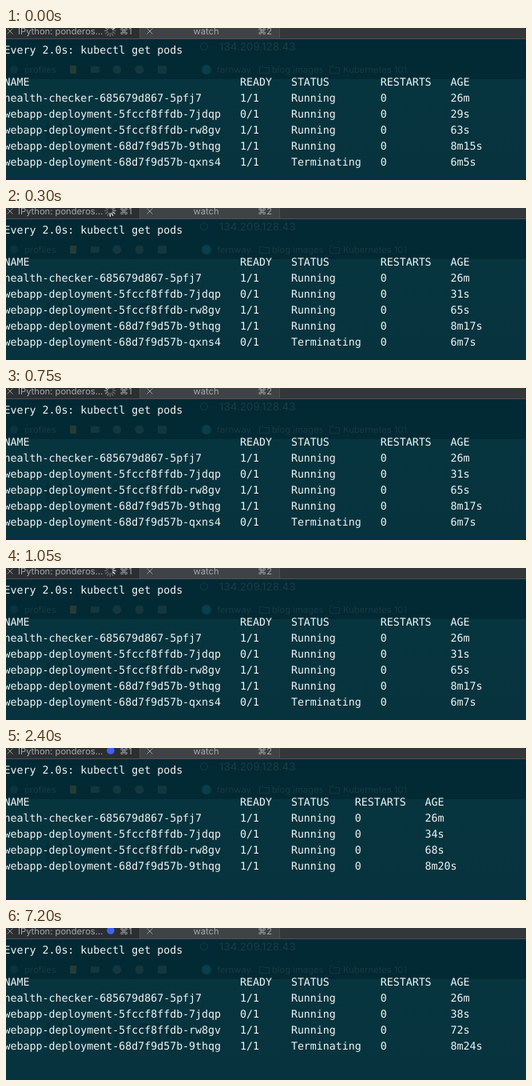
Write an HTML page that moves like this. It is 651 by 190 pixels and loops after 8 s.

```html
<!DOCTYPE html>
<html lang="en">
<head>
<meta charset="utf-8">
<title>Watching pods</title>
<style>
  html, body { margin: 0; width: 100%; height: 100%; overflow: hidden; background: #022a34; }
  svg { display: block; width: 651px; height: 190px; }
  text { white-space: pre; text-rendering: geometricPrecision; }
  .tabs { font: 11.2px Inter, "DejaVu Sans", sans-serif; fill: #a4a7a9; }
  .cross { stroke: #96999b; fill: none; }
  .behind { font: 11.2px Inter, sans-serif; fill: #163b44; }
  .term { font: 13.288px "DejaVu Sans Mono", monospace; fill: #f0f5f5; }
</style>
</head>
<body>
<svg viewBox="0 0 651 190">
  <defs>
    <linearGradient id="page" x2="0" y2="1">
      <stop offset="0" stop-color="#07353f"/>
      <stop offset="1" stop-color="#06333d"/>
    </linearGradient>
  </defs>

  <!-- browser showing through the terminal -->
  <rect y="14" width="651" height="50" fill="#022a34"/>
  <rect y="64" width="651" height="126" fill="url(#page)"/>
  <g class="behind">
    <circle cx="248" cy="23" r="4.5" fill="none" stroke="#163b44"/>
    <text x="267" y="27.5" font-size="13.4" fill="#1b3c45">134.209.128.43</text>
    <circle cx="10" cy="52" r="5" fill="#0c343e"/>
    <text x="23" y="56">profiles</text>
    <g fill="#12373f">
      <rect x="80" y="47" width="8" height="10" fill="#253c34"/>
      <rect x="106" y="48" width="11" height="8" rx="1"/>
      <circle cx="139" cy="52" r="5.5"/>
      <circle cx="167" cy="52" r="5.5"/>
      <rect x="190" y="47" width="11" height="10" rx="1"/>
      <circle cx="251" cy="52" r="6" fill="#07404a"/>
    </g>
    <text x="264" y="56">fernway</text>
    <path id="folder" d="M317.5 48h4l1 1.5h7v7h-12z" fill="none" stroke="#12373f"/>
    <text x="333" y="56">blog images</text>
    <use href="#folder" x="88"/>
    <text x="422" y="56">Kubernetes 101</text>
    <text x="48" y="143" font-size="33" font-weight="700" fill="#042e38">Health Check</text>
  </g>

  <!-- tab bar -->
  <rect width="651" height="14" fill="#34373a"/>
  <rect width="167" height="14" fill="#2c2f32"/>
  <rect x="168" width="174" height="14" fill="#404346"/>
  <path d="M167.5 0v14M342.5 0v14M0 13.5h651" stroke="#4c5053"/>
  <g class="tabs">
    <path class="cross" d="M1.5 0.5l7 7m0-7l-7 7M176.5 0.5l7 7m0-7l-7 7"/>
    <text x="15" y="7.5">IPython: ponderos…</text>
    <text x="142" y="7.5">⌘1</text>
    <text x="250.5" y="7.5" text-anchor="middle">watch</text>
    <text x="315" y="7.5">⌘2</text>
  </g>
  <g id="spinner" stroke="#e4e6e7" stroke-width="1.4" stroke-linecap="round"></g>
  <circle id="dot" cx="131" cy="3" r="4.8" fill="#3f62f2"/>

  <g id="term" class="term"></g>
</svg>
<script>
  const LOOP = 8000, SPIN_END = 1200, SPIN_STEP = 150, SPOKES = 12;
  const NS = "http://www.w3.org/2000/svg";
  const $ = id => document.getElementById(id);

  const add = (parent, tag, attrs) => {
    const el = document.createElementNS(NS, tag);
    for (const key in attrs) el.setAttribute(key, attrs[key]);
    return parent.appendChild(el);
  };

  const HEALTH = "health-checker-685679d867-5pfj7";
  const NEW = "webapp-deployment-5fccf8ffdb-";
  const OLD = "webapp-deployment-68d7f9d57b-";

  const age = s => s < 120 ? s + "s"
    : s < 600 ? Math.floor(s / 60) + "m" + s % 60 + "s"
    : Math.floor(s / 60) + "m";

  // sec: seconds since the first refresh; last: ready count of the old pod, if still listed
  const screens = [
    { at: 0, sec: 0, last: "1/1" },
    { at: 300, sec: 2, last: "0/1" },
    { at: 2400, sec: 5 },
    { at: 4650, sec: 7 },
    { at: 7200, sec: 9, stopping: true }
  ];

  function table({ sec, last, stopping }) {
    const pod = (name, ready, status, start) => [name, ready, status, "0", age(start + sec)];
    const rows = [
      ["NAME", "READY", "STATUS", "RESTARTS", "AGE"],
      [HEALTH, "1/1", "Running", "0", "26m"],
      pod(NEW + "7jdqp", "0/1", "Running", 29),
      pod(NEW + "rw8gv", "1/1", "Running", 63),
      pod(OLD + "9thqg", "1/1", stopping ? "Terminating" : "Running", 495)
    ];
    if (last) rows.push(pod(OLD + "qxns4", last, "Terminating", 365));
    const widths = rows[0].map((_, c) => Math.max(...rows.map(r => r[c].length)) + 3);
    return rows.map(r => r.map((cell, c) => cell.padEnd(widths[c])).join("").trimEnd());
  }

  for (const screen of screens) {
    screen.el = add($("term"), "g", {});
    ["Every 2.0s: kubectl get pods", "", ...table(screen)].forEach((line, i) => {
      add(screen.el, "text", { x: -2.5, y: 32 + i * 20 }).textContent = line;
    });
  }

  const spokes = Array.from({ length: SPOKES }, (_, i) => add($("spinner"), "path", {
    d: "M0 -3.6V-6.8",
    transform: `translate(130.4 3.4) rotate(${i * 360 / SPOKES})`
  }));

  function draw(now) {
    const t = now % LOOP;
    const current = screens.filter(s => s.at <= t).pop();
    for (const s of screens) s.el.style.display = s === current ? "" : "none";

    const busy = t < SPIN_END;
    $("spinner").style.display = busy ? "" : "none";
    $("dot").style.display = busy ? "none" : "";
    const head = 2 * Math.floor(t / SPIN_STEP) + 2;
    spokes.forEach((el, i) => {
      const lag = (((head - i) % SPOKES) + SPOKES) % SPOKES;
      el.style.opacity = Math.max(0.3, 1 - lag * 0.12);
    });
  }

  function tick() {
    draw(performance.now());
    requestAnimationFrame(tick);
  }
  tick();
</script>
</body>
</html>
```
